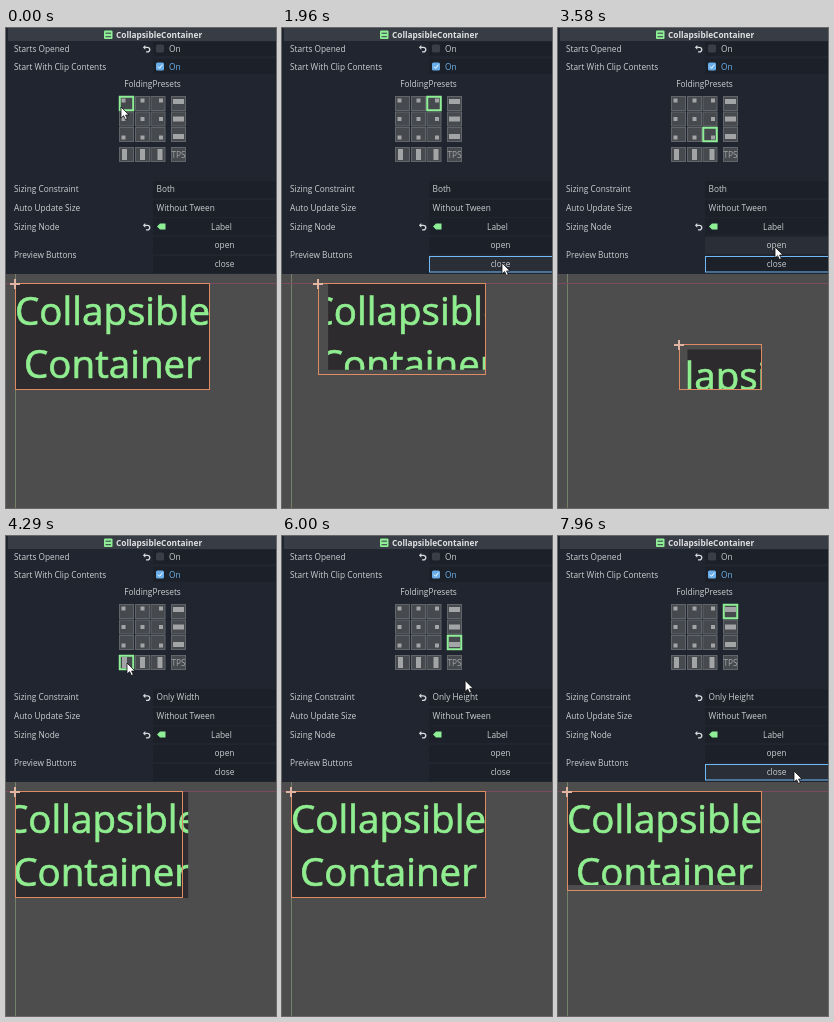
Write an HTML page that moves like this. It is 270 px wide and 480 px high and loops after 8000 ms.

```html
<!DOCTYPE html>
<html lang="en">
<head>
<meta charset="utf-8">
<title>Collapsible container</title>
<style>
  html, body { margin: 0; width: 100%; height: 100%; overflow: hidden; background: #4d4d4d; }
  svg { display: block; width: 100vw; height: 100vh; }
  text { font: 400 8.3px "Open Sans", "Noto Sans", sans-serif; fill: #cdcfd2; }
  .mid { text-anchor: middle; }
  .title { font-weight: 700; fill: #dfe0e2; }
  .big { font-size: 38.5px; fill: #90ee90; stroke: #90ee90; stroke-width: .7; text-anchor: middle; }
  .line { fill: none; stroke-width: 1; }
</style>
</head>
<body>
<svg viewBox="0 0 270 480" preserveAspectRatio="none">
  <defs>
    <clipPath id="clip"><rect id="clipBox"/></clipPath>
    <g id="revert" class="line" stroke="#d8dadd" style="stroke-width:1.3">
      <path d="M-2.5-1.2H1a2.3 2.3 0 0 1 0 4.6H-.5"/>
      <path d="M-1.2-3.6L-3.6-1.2L-1.2 1.2Z" fill="#d8dadd" stroke="none"/>
    </g>
  </defs>

  <rect width="270" height="480" fill="#4d4d4d"/>
  <path class="line" d="M9.5 246V480" stroke="#758069"/>
  <path class="line" d="M0 255.5H270" stroke="#7b4a60"/>

  <rect id="panel" fill="#2e2b2e"/>
  <g clip-path="url(#clip)">
    <g id="label">
      <text class="big" y="40.5">Collapsible</text>
      <text class="big" y="93.5">Container</text>
    </g>
  </g>
  <rect id="outline" class="line" stroke="#df8b64"/>
  <path id="pivot" class="line" d="M-5 0H5M0-5V5" stroke="#e2b5a3" style="stroke-width:2"/>

  <rect width="270" height="246" fill="#20252f"/>
  <rect x="2" width="268" height="13" fill="#383c44"/>
  <g fill="#8eef97">
    <rect x="98" y="2.5" width="8.5" height="8.5" rx="1"/>
    <path d="M99.5 5.2H105M99.5 8.7H105" stroke="#383c44"/>
  </g>
  <text class="title" x="110" y="9.6">CollapsibleContainer</text>

  <text x="8" y="23.5">Starts Opened</text>
  <text x="8" y="41.5">Start With Clip Contents</text>
  <text class="mid" x="146.5" y="59">FoldingPresets</text>
  <text x="8" y="164">Sizing Constraint</text>
  <text x="8" y="183">Auto Update Size</text>
  <text x="8" y="201.5">Sizing Node</text>
  <text x="8" y="230">Preview Buttons</text>

  <g fill="#1b2029">
    <rect x="147" y="14" width="123" height="14"/>
    <rect x="147" y="31" width="123" height="15"/>
    <rect x="147" y="153" width="123" height="17"/>
    <rect x="147" y="172" width="123" height="17"/>
    <rect x="147" y="190" width="123" height="17"/>
  </g>
  <use href="#revert" x="140.5" y="20.5"/>
  <use href="#revert" x="140.5" y="198.5"/>
  <use id="constraintRevert" href="#revert" x="140.5" y="161"/>
  <rect x="150" y="16.5" width="8" height="8" rx="1.5" fill="#3a3e46"/>
  <rect x="150" y="34.5" width="8" height="8" rx="1.5" fill="#69aeea"/>
  <path class="line" d="M152 38.6L153.6 40.3L156.4 36.7" stroke="#fff"/>
  <text x="163" y="23.5">On</text>
  <text x="163" y="41.5" style="fill:#70b5ee">On</text>
  <text id="constraint" x="150.5" y="164">Both</text>
  <text x="150.5" y="183">Without Tween</text>
  <path d="M151 198.5L154 195.5H159.5V201.5H154Z" fill="#8eef97"/>
  <text class="mid" x="215.5" y="201.5">Label</text>

  <rect id="openButton" x="147" y="209" width="123" height="17"/>
  <rect id="closeButton" x="147" y="228" width="123" height="17"/>
  <text class="mid" x="218.5" y="220.3">open</text>
  <text class="mid" x="218.5" y="239.3">close</text>
  <rect id="focus" class="line" x="147.5" width="125" height="15.5" stroke="#70bafa"/>

  <g id="presets"></g>
  <text class="mid" x="172.5" y="129.5" style="fill:#a6a8aa">TPS</text>
  <rect id="selection" class="line" width="13.5" height="13.5" stroke="#8eef97" style="stroke-width:2"/>

  <path id="cursor" d="M0 0V11L2.6 8.7L4.4 12.5L6.3 11.6L4.6 8H8Z" fill="#fff" stroke="#111" stroke-width=".8"/>
</svg>

<script>
const LOOP = 8000, TWEEN = 500, LAG = 1000 / 60;
const FULL = { x: 9, y: 256, w: 195, h: 106 };
const COLS = [113, 129, 144.5, 165], ROWS = [68, 83.5, 99, 119];
const $ = id => document.getElementById(id);

function set(node, attrs) {
  for (const key in attrs) node.setAttribute(key, attrs[key]);
}

function addRect(x, y, width, height, fill, stroke = "none") {
  const rect = document.createElementNS("http://www.w3.org/2000/svg", "rect");
  set(rect, { x, y, width, height, fill, stroke });
  $("presets").append(rect);
}

// Preset buttons: corner dots, horizontal bars and vertical bars.
ROWS.forEach((y, row) => COLS.forEach((x, col) => {
  addRect(x + .5, y + .5, 14, 14, "#46494d", "#616468");
  const mark = "#a2a4a6";
  if (row < 3 && col < 3) addRect(x + 2.5 + col * 3, y + 2.5 + row * 3, 4, 4, mark);
  else if (row < 3) addRect(x + 2, y + 3 + row * 2, 11, 5, mark);
  else if (col < 3) addRect(x + 3 + col * 2, y + 2, 5, 11, mark);
}));

// ax, ay: side that stays fixed; sx, sy: whether that axis folds.
const presets = [
  { at: 0,    col: 0, row: 0, ax: 0, ay: 0, sx: 1, sy: 1, text: "Both" },
  { at: 1390, col: 2, row: 0, ax: 1, ay: 0, sx: 1, sy: 1, text: "Both" },
  { at: 2870, col: 2, row: 2, ax: 1, ay: 1, sx: 1, sy: 1, text: "Both" },
  { at: 4290, col: 0, row: 3, ax: 0, ay: 0, sx: 1, sy: 0, text: "Only Width" },
  { at: 5800, col: 3, row: 2, ax: 0, ay: 1, sx: 0, sy: 1, text: "Only Height" },
  { at: 7360, col: 3, row: 0, ax: 0, ay: 0, sx: 0, sy: 1, text: "Only Height" }
];

const clicks = [
  [310, "close"], [858, "open"], [1900, "close"], [2483, "open"],
  [3369, "close"], [3943, "open"], [4782, "close"], [5390, "open"],
  [6330, "close"], [6873, "open"], [7922, "close"]
].map(([at, action]) => ({ at, action }));

const path = [
  [0, 115, 79], [40, 115, 79], [280, 222, 235], [360, 222, 235],
  [600, 221, 216], [880, 221, 216], [1250, 145, 99], [1360, 151, 76],
  [1430, 151, 76], [1860, 220, 235], [1950, 220, 235], [2220, 219, 216],
  [2510, 219, 216], [2670, 178, 153], [2840, 152, 107], [2900, 152, 107],
  [3330, 216, 235], [3400, 216, 235], [3580, 217, 219], [3970, 217, 217],
  [4260, 121, 127], [4320, 121, 127], [4740, 200, 235], [4830, 200, 235],
  [5080, 199, 218], [5420, 200, 217], [5770, 172, 107], [5840, 172, 107],
  [6290, 210, 235], [6380, 210, 235], [6620, 209, 214], [6980, 209, 214],
  [7330, 172, 77], [7390, 172, 77], [7880, 236, 235], [8000, 236, 235]
];

const latest = (list, t) => list.filter(item => item.at <= t).pop();

function openness(t) {
  const click = latest(clicks, t);
  if (!click) return 1;
  const eased = Math.sin(Math.min(1, (t - click.at) / TWEEN) * Math.PI / 2);
  return click.action === "open" ? eased : 1 - eased;
}

function boxAt(t, preset) {
  const amount = openness(t);
  const width = FULL.w * (preset.sx ? amount : 1);
  const height = FULL.h * (preset.sy ? amount : 1);
  return {
    x: FULL.x + preset.ax * (FULL.w - width),
    y: FULL.y + preset.ay * (FULL.h - height),
    width, height
  };
}

function cursorAt(t) {
  const i = path.findIndex(point => point[0] > t);
  const [t0, x0, y0] = path[i - 1], [t1, x1, y1] = path[i];
  const u = (t - t0) / (t1 - t0), k = u * u * (3 - 2 * u);
  return [x0 + (x1 - x0) * k, y0 + (y1 - y0) * k];
}

function draw(t) {
  const preset = latest(presets, t), click = latest(clicks, t);
  const box = boxAt(t, preset), edge = boxAt(t - LAG, preset);

  set($("panel"), box);
  set($("clipBox"), box);
  set($("label"), { transform: `translate(${box.x + box.width / 2} ${box.y})` });
  set($("outline"), {
    x: Math.round(edge.x) + .5, y: Math.round(edge.y) - .5,
    width: Math.max(.01, Math.round(edge.width) - 1),
    height: Math.max(.01, Math.round(edge.height))
  });
  set($("pivot"), { transform: `translate(${Math.round(edge.x)} ${Math.round(edge.y)})` });

  set($("selection"), { x: COLS[preset.col] + .75, y: ROWS[preset.row] + .75 });
  $("constraint").textContent = preset.text;
  set($("constraintRevert"), { visibility: preset.text === "Both" ? "hidden" : "visible" });

  const focused = click && click.at >= preset.at;
  set($("focus"), {
    visibility: focused ? "visible" : "hidden",
    y: focused && click.action === "close" ? 228.5 : 209.5
  });

  const [x, y] = cursorAt(t);
  const fill = top => x > 147 && y >= top && y < top + 18 ? "#292e37" : "#1b2029";
  set($("openButton"), { fill: fill(208.5) });
  set($("closeButton"), { fill: fill(227) });
  set($("cursor"), { transform: `translate(${x} ${y})` });
}

function frame() {
  draw(performance.now() % LOOP);
  requestAnimationFrame(frame);
}
frame();
</script>
</body>
</html>
```
